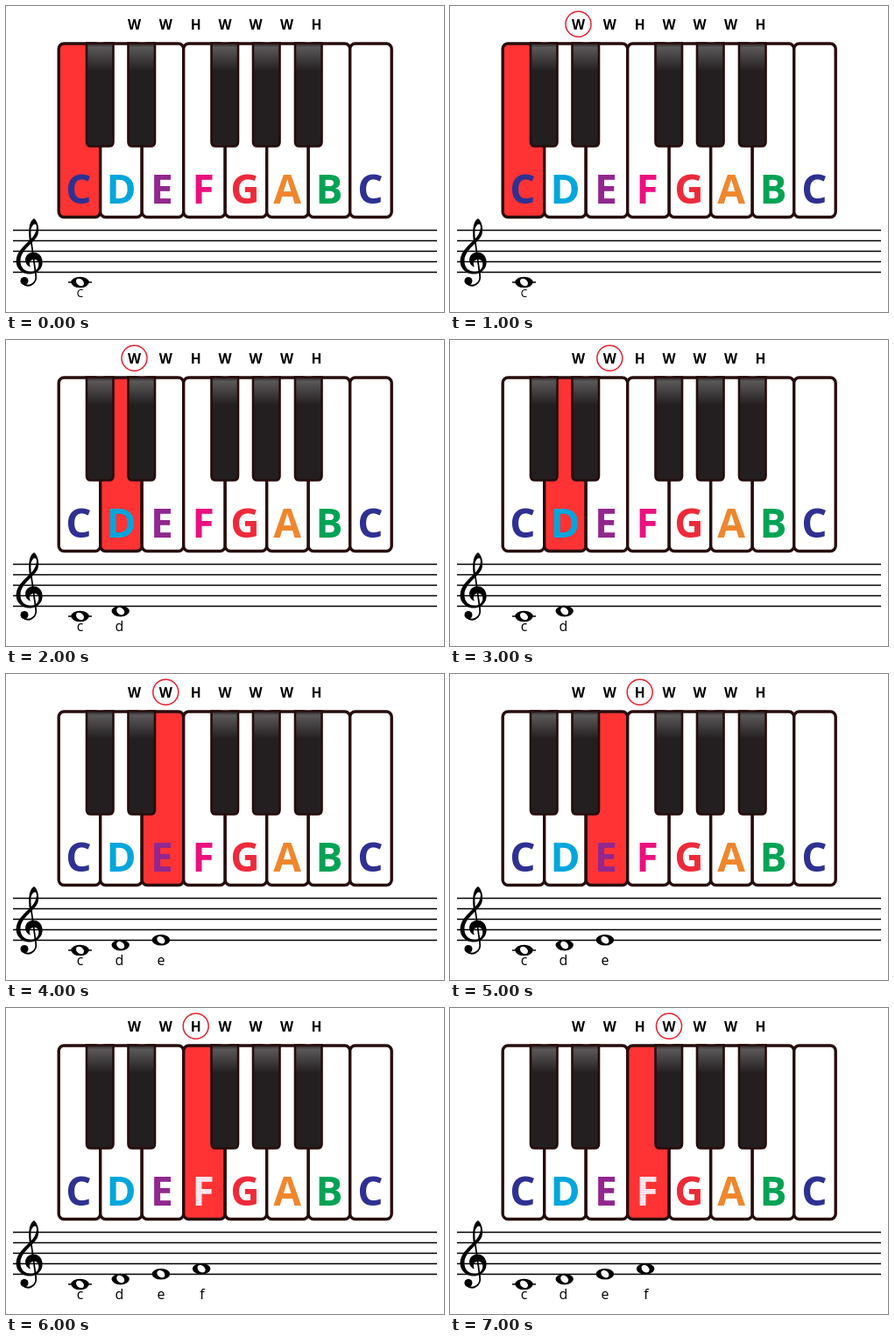
Recreate the animation shown at these times as an HTML page. Size 500x350 px, loop 8000 ms.

```html
<!DOCTYPE html>
<html lang="en">
<head>
<meta charset="utf-8">
<title>C major scale</title>
<style>
  html, body { margin: 0; width: 100%; height: 100%; overflow: hidden; background: #fff; }
  svg { display: block; width: 500px; height: 350px; }
  text { font-family: "Open Sans", "Noto Sans", sans-serif; text-anchor: middle; }
  .key { fill: #fff; stroke: #270c0c; stroke-width: 3.4; }
  .black { fill: url(#gloss); stroke: #270c0c; stroke-width: 2.6; }
  .name { font-size: 46px; font-weight: 700; }
  .step { font-size: 15.6px; font-weight: 700; }
  .line { stroke: #000; stroke-width: 1.5; }
</style>
</head>
<body>
<svg viewBox="0 0 500 350">
  <defs>
    <linearGradient id="gloss" x1="0" y1="0" x2="0" y2="1">
      <stop offset="0" stop-color="#231f20"/>
      <stop offset=".04" stop-color="#5a5859"/>
      <stop offset=".27" stop-color="#231f20"/>
    </linearGradient>
  </defs>
  <g id="stage"></g>
  <g id="clef">
    <path d="M32 243C36 246 38.5 254 36.5 261C34 270 17 278 16.5 291C16 301 24 305 31 303.5C38 302 39 293 35 290.5C30 288 24.5 292 28 298.5C20 296 20 284 29 282C38 280 42.5 288 41.5 295C40 304 32 307 25 306.5C15 305 10 297 12 288C14 279 23 272 29 266C33 262 36 255 34.5 250.5C33 248 30 250 28.5 255C28 262 29 268 30 272L27.5 272C25.5 262 25 247 32 243Z"/>
    <path d="M28.6 268L34 307C36 318 25 323 19 317" fill="none" stroke="#000" stroke-width="1.8"/>
    <circle cx="21" cy="314.5" r="4.5"/>
  </g>
</svg>
<script>
const stage = document.getElementById("stage");

function add(tag, attrs, parent = stage, text = "") {
  const el = document.createElementNS("http://www.w3.org/2000/svg", tag);
  for (const k in attrs) el.setAttribute(k, attrs[k]);
  el.textContent = text;
  parent.append(el);
  return el;
}

const names = [..."CDEFGABC"];
const nameX = [83, 131.5, 178, 225, 273, 321, 369, 416];
const colors = ["#2e3192", "#00a6dc", "#92278f", "#ec0f7f", "#ee2a3a", "#f0862c", "#00a354", "#2e3192"];
const stepX = [146.5, 182.3, 216.7, 250, 285, 320.5, 354.5];

const keys = names.map((_, i) =>
  add("rect", { class: "key", x: 60.2 + 47.5 * i, y: 43, width: 47.5, height: 198.5, rx: 6 }));
const letters = names.map((name, i) =>
  add("text", { class: "name", x: nameX[i], y: 226, fill: colors[i] }, stage, name));

for (const x of [92, 139.5, 234.5, 282, 330])
  add("path", { class: "black", d: `M${x} 42.5h30.5v113q0 5-5 5h-20.5q-5 0-5-5z` });

[..."WWHWWWH"].forEach((s, i) => add("text", { class: "step", x: stepX[i], y: 27 }, stage, s));
const ring = add("circle", { cy: 20.7, r: 14.5, fill: "none", stroke: "#e8202e", "stroke-width": 1.5 });

for (let i = 0; i < 5; i++)
  add("line", { class: "line", x1: 8, x2: 492, y1: 256.4 + 12 * i, y2: 256.4 + 12 * i });

const notes = [..."cdef"].map((label, i) => {
  const x = 84.5 + 46.2 * i, y = 316 - 5.9 * i;
  const g = add("g", {});
  if (!i) add("line", { class: "line", x1: 71, x2: 98, y1: y, y2: y }, g);
  add("ellipse", { cx: x, cy: y, rx: 10.2, ry: 6.3 }, g);
  add("ellipse", { cx: x, cy: y, rx: 5, ry: 3.7, fill: "#fff", transform: `rotate(40 ${x} ${y})` }, g);
  g.label = add("text", { x: [84.5, 129.5, 177, 224][i], y: 333, "font-size": 16 }, g, label);
  return g;
});

function draw(now) {
  // Odd seconds circle the next step, even seconds press its key.
  const beat = Math.floor(now % 8000 / 1000);
  const pressed = beat >> 1;
  const step = (beat + 1 >> 1) - 1;

  keys.forEach((key, i) => key.style.fill = i === pressed ? "#ff3333" : "#fff");
  letters[3].setAttribute("fill", pressed === 3 ? "#fce4ec" : colors[3]);
  ring.style.display = step < 0 ? "none" : "";
  ring.setAttribute("cx", stepX[Math.max(step, 0)]);
  notes.forEach((note, i) => note.style.display = i <= pressed ? "" : "none");

  const first = notes[0].label;
  first.textContent = pressed ? "c" : "C";
  first.setAttribute("font-size", pressed ? 16 : 12);
  requestAnimationFrame(draw);
}
draw(performance.now());
</script>
</body>
</html>
```
